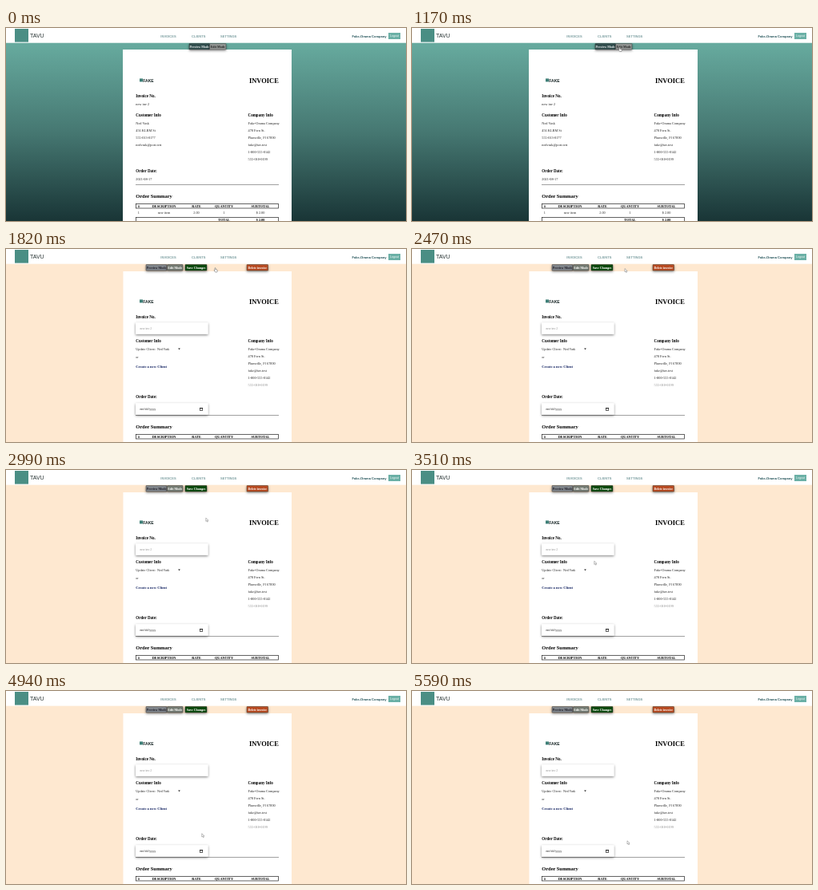
These frames come from a looping animation (500 px wide and 242 px high, 6500 ms). An HTML page:

```html
<!DOCTYPE html>
<html lang="en">
<head>
<meta charset="utf-8">
<title>Invoice editor</title>
<style>
  html, body { margin: 0; width: 100%; height: 100%; overflow: hidden; background: #fff; }
  svg { display: block; width: 100vw; height: 100vh; }
  .serif { font-family: "Liberation Serif", "Times New Roman", serif; }
  .sans { font-family: "Liberation Sans", Arial, sans-serif; }
  .mono { font-family: "Liberation Mono", "Courier New", monospace; }
</style>
</head>
<body>
<svg id="stage" viewBox="0 0 500 242" preserveAspectRatio="none">
  <defs>
    <linearGradient id="teal" x1="0" y1="0" x2="0" y2="1">
      <stop offset="0" stop-color="#67ab9f"/>
      <stop offset=".5" stop-color="#467872"/>
      <stop offset="1" stop-color="#193536"/>
    </linearGradient>
    <filter id="shadow" x="-20%" y="-40%" width="140%" height="200%">
      <feDropShadow dx="0" dy="1.2" stdDeviation="1.5" flood-color="#000" flood-opacity=".5"/>
    </filter>
  </defs>
  <g id="preview"></g>
  <g id="edit"></g>
  <g id="header"></g>
  <g id="pointer">
    <path id="arrow" d="M0 0V4.2L1 3.4L1.8 5L2.5 4.7L1.9 3.1H3.2Z" fill="#fff" stroke="#777" stroke-width=".5"/>
    <path id="hand" d="M1 .4Q1.6 -.3 2.1 .5V2.2L4 2.7Q4.5 2.9 4.3 3.8L3.8 5.5H1.6L0 3.3Q.3 2.7 1 3.2Z" fill="#fff" stroke="#555" stroke-width=".5"/>
  </g>
</svg>
<script>
const NS = "http://www.w3.org/2000/svg";
const byId = id => document.getElementById(id);

function add(parent, tag, attrs) {
  const node = document.createElementNS(NS, tag);
  for (const key in attrs) node.setAttribute(key, attrs[key]);
  return parent.appendChild(node);
}

const rect = (g, x, y, width, height, fill, more = {}) =>
  add(g, "rect", { x, y, width, height, fill, ...more });

const line = (g, x1, x2, y, stroke) =>
  add(g, "path", { d: `M${x1} ${y}H${x2}`, stroke, "stroke-width": 0.7 });

const text = (g, x, y, size, content, more = {}) => {
  add(g, "text", { x, y, "font-size": size, class: "serif", fill: "#222", ...more }).textContent = content;
};

const bold = { "font-weight": 700, fill: "#000" };
const middle = { "text-anchor": "middle" };
const sans = { class: "sans" };
const outline = { stroke: "#222", "stroke-width": 0.7 };

function button(g, x, width, label, fill, color) {
  rect(g, x, 19.5, width, 7.5, fill,
    { rx: 0.5, filter: "url(#shadow)", stroke: "#2a2a2a", "stroke-width": 0.4 });
  text(g, x + width / 2, 24.7, 4, label, { ...middle, fill: color, "font-weight": 700 });
}

function field(g, y) {
  rect(g, 162, y, 90.5, 14.5, "#fff", { rx: 0.7, filter: "url(#shadow)" });
}

function lines(g, x, y, step, list) {
  list.forEach((content, i) => text(g, x, y + i * step, 4.3, content));
}

function drawHeader(g) {
  rect(g, 0, 0, 500, 18.7, "#fff");
  rect(g, 11, 1, 17, 16.6, "#4a8e84");
  text(g, 30, 12, 7, "TAVU", { ...sans, fill: "#243030" });
  [[203, "INVOICES"], [240.7, "CLIENTS"], [278.2, "SETTINGS"]].forEach(([x, label]) =>
    text(g, x, 11.6, 4.05, label, { ...sans, ...middle, fill: "#7b9ea0", "font-weight": 700 }));
  text(g, 475.5, 11.8, 4.05, "Fake-Orama Company",
    { ...sans, "text-anchor": "end", "font-weight": 700, fill: "#24545a" });
  rect(g, 478, 6, 15, 8, "#6bb0a6");
  text(g, 485.5, 11.2, 3.6, "Logout", { ...sans, ...middle, fill: "#fff" });
}

function drawPaper(g, x, top) {
  rect(g, x, top, 357 - x, 242 - top, "#fff");
  rect(g, 167, 63.4, 4, 4, "#3f8078");
  text(g, 171.3, 68, 5, "FAKE", { ...sans, ...bold, fill: "#182626" });
  text(g, 340.8, 68.6, 8.45, "INVOICE", { ...bold, "text-anchor": "end" });
  text(g, 162.3, 86.7, 5.05, "Invoice No.", bold);
}

// The details and the table sit lower in edit mode, by their own offsets.
function drawDetails(g, shift, tableShift) {
  text(g, 162.3, 111.2 + shift, 5.05, "Customer Info", bold);
  text(g, 302.5, 111.2 + shift, 5.05, "Company Info", bold);
  lines(g, 302.5, 121 + shift, 9, ["Fake-Orama Company", "478 Fern St.", "Plumville, Fl 67890",
    "fake@tav.test", "1-800-555-0142"]);
  text(g, 162.3, 181 + shift, 5.05, "Order Date:", bold);
  line(g, 162, 341, 196.5 + tableShift, "#777");
  text(g, 162.3, 212.7 + tableShift, 6.4, "Order Summary", bold);
  rect(g, 162.5, 220.5 + tableShift, 178, 5.5, "none", outline);
  [[166, "#"], [197.5, "DESCRIPTION"], [238, "RATE"], [272.5, "QUANTITY"], [318, "SUBTOTAL"]]
    .forEach(([x, label]) => text(g, x, 224.7 + tableShift, 4.25, label, { ...bold, ...middle }));
}

function drawPreview(g) {
  rect(g, 0, 18, 500, 224, "url(#teal)");
  drawPaper(g, 146, 27);
  button(g, 229, 25.5, "Preview Mode", "#33504f", "#e8eeee");
  button(g, 254.5, 20.5, "Edit Mode", "#8f9391", "#222");
  drawDetails(g, 0, 0);
  text(g, 302.5, 166, 4.3, "555-010-0199");
  text(g, 162.3, 96.6, 4.3, "new inv 2");
  lines(g, 162.3, 121, 9.1, ["Ned Vask", "456 KLRM St", "555-013-0177", "nedvask@post.test"]);
  text(g, 162.3, 190.8, 4.3, "2021-08-17");
  [[165.7, "1"], [197.5, "new item"], [238, "2.00"], [272.5, "1"], [318, "$ 2.00"]]
    .forEach(([x, label]) => text(g, x, 233.2, 4.2, label, middle));
  rect(g, 162.5, 237.5, 178, 8, "none", outline);
  text(g, 272.5, 241.5, 4.2, "TOTAL", { ...bold, ...middle });
  text(g, 318, 241.5, 4.2, "$ 2.00", { ...bold, ...middle });
}

function drawEdit(g) {
  rect(g, 0, 18, 500, 224, "#fee8d0");
  drawPaper(g, 146.5, 28);
  button(g, 175, 26, "Preview Mode", "#80858a", "#1c1c28");
  button(g, 201.5, 19.5, "Edit Mode", "#747b73", "#fff");
  button(g, 224, 27, "Save Changes", "#0b4a10", "#fff");
  button(g, 301, 26.5, "Delete invoice", "#b84c22", "#fff");
  drawDetails(g, 5.5, 12);
  text(g, 302.5, 171.5, 4.3, "555-010-0199", { fill: "#888" });
  field(g, 92.3);
  text(g, 167.5, 101, 3.7, "new inv 2", { fill: "#888" });
  text(g, 162.3, 126.7, 4.2, "Update Client:");
  text(g, 189, 126.7, 4, "Ned Vask");
  add(g, "path", { d: "M215.2 124.6h2.6l-1.3 1.6Z", fill: "#111" });
  text(g, 162.3, 137, 3.9, "or");
  text(g, 162.3, 148.7, 4.6, "Create a new Client", { ...bold, fill: "#10205f" });
  field(g, 193.3);
  text(g, 167.5, 202.2, 3.3, "mm/dd/yyyy", { class: "mono", fill: "#222" });
  rect(g, 242.6, 199.4, 3.1, 3.1, "none", outline);
  line(g, 242.3, 246, 199.8, "#111");
}

drawPreview(byId("preview"));
drawEdit(byId("edit"));
drawHeader(byId("header"));

const LOOP = 6500, TICK = 130;
const SHOW_AT = 650, EDIT_AT = 1820, HAND = [1040, 2080];
// Pointer stops as [time, x, y]; it glides through them without halting.
const stops = [
  [650, 270, 50], [1170, 258, 24], [1820, 260, 23.5], [2080, 266, 24.5],
  [2470, 266, 24.5], [3510, 227.8, 114.2], [4420, 222, 162.5], [5590, 269, 187.8]
];

function speed(i, axis) {
  const before = stops[i - 1], after = stops[i + 1];
  const resting = i === 0 || i === stops.length - 1 || stops[i][0] <= 2470;
  return resting ? 0 : (after[axis] - before[axis]) / (after[0] - before[0]);
}

// Cubic Hermite curve between two neighbouring stops.
function pointerAt(t) {
  const last = stops.length - 1;
  const i = stops.findIndex((stop, n) => n < last && t < stops[n + 1][0]);
  if (i < 0) return stops[last].slice(1);
  const a = stops[i], b = stops[i + 1], span = b[0] - a[0];
  const k = Math.max(0, (t - a[0]) / span), rest = 1 - k;
  return [1, 2].map(axis =>
    a[axis] * rest * rest * (1 + 2 * k) + b[axis] * k * k * (3 - 2 * k) +
    span * k * rest * (speed(i, axis) * rest - speed(i + 1, axis) * k));
}

const show = (id, on) => byId(id).setAttribute("display", on ? "inline" : "none");

function render(ms) {
  const t = Math.floor((ms % LOOP) / TICK) * TICK;
  const hand = t >= HAND[0] && t < HAND[1];
  show("preview", t < EDIT_AT);
  show("edit", t >= EDIT_AT);
  show("pointer", t >= SHOW_AT);
  show("hand", hand);
  show("arrow", !hand);
  byId("pointer").setAttribute("transform", `translate(${pointerAt(t)})`);
}

const start = performance.now();
function frame() {
  render(performance.now() - start);
  requestAnimationFrame(frame);
}
frame();
</script>
</body>
</html>
```
